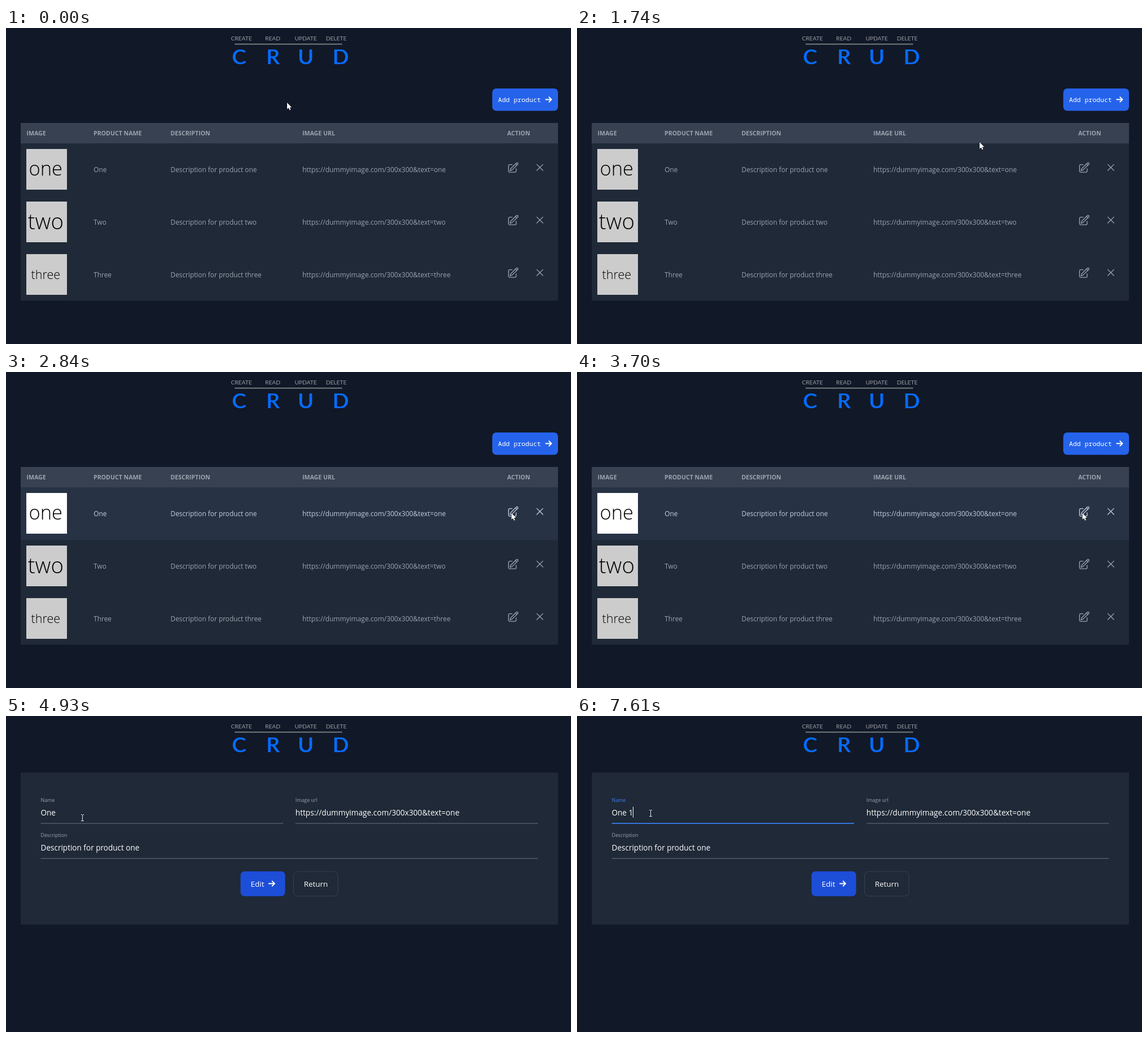
These frames come from a looping animation (1001 px wide and 559 px high, 8000 ms). An HTML page with a canvas:

```html
<!DOCTYPE html>
<html lang="en">
<head>
<meta charset="utf-8">
<title>CRUD</title>
<style>
html, body { margin: 0; width: 100%; height: 100%; overflow: hidden; background: #111827; }
canvas { display: block; }
</style>
</head>
<body>
<canvas id="stage" width="1001" height="559"></canvas>
<script>
const ctx = document.getElementById('stage').getContext('2d');
const LOOP = 8000, FORM_AT = 3790, FOCUS_AT = 5420, BLINK = 530;
const SANS = '"Open Sans", "Noto Sans", sans-serif';
const TITLE = 'Lato, sans-serif';
const MONO = '"Noto Sans Mono", monospace';
const GRAY = '#9ca3af', PANEL = '#1f2937', WHITE = '#ffffff';

const PENCIL = new Path2D('m16.862 4.487 1.687-1.688a1.875 1.875 0 1 1 2.652 2.652L10.582 16.07a4.5 4.5 0 0 1-1.897 1.13L6 18l.8-2.685a4.5 4.5 0 0 1 1.13-1.897l8.932-8.931Zm0 0L19.5 7.125M18 14v4.75A2.25 2.25 0 0 1 15.75 21H5.25A2.25 2.25 0 0 1 3 18.75V8.25A2.25 2.25 0 0 1 5.25 6H10');
const CROSS = new Path2D('M6 18 18 6M6 6l12 12');
const ARROW = new Path2D('M3 10h13M11 4.2l6 5.8-6 5.8');
const POINTER = new Path2D('M0 0V11.6L2.7 9.2 4.5 13.2 6.4 12.4 4.7 8.5H8.2Z');

// time, x, y
const POINTER_PATH = [[910, 498, 132], [1740, 713, 202], [2230, 859, 249], [2500, 887, 255], [2570, 887, 255], [2840, 895.5, 249.5]];
const BEAM_PATH = [[4050, 897, 250], [4860, 138, 181], [5150, 127.5, 175], [5640, 127.5, 175], [5750, 130.3, 171.5]];

const clamp = v => Math.max(0, Math.min(1, v));

function along(path, t) {
  const last = path.length - 1;
  if (t <= path[0][0]) return path[0].slice(1);
  if (t >= path[last][0]) return path[last].slice(1);
  const i = path.findIndex(k => k[0] > t) - 1;
  const a = path[i], b = path[i + 1];
  let u = (t - a[0]) / (b[0] - a[0]);
  if (i === 0) u = u * u * (1.6 - 0.6 * u) * 0.6 + u * 0.4;
  return [1, 2].map(n => a[n] + (b[n] - a[n]) * u);
}

function rect(x, y, w, h, fill) {
  ctx.fillStyle = fill;
  ctx.fillRect(x, y, w, h);
}

function rounded(x, y, w, h, fill, stroke) {
  ctx.beginPath();
  ctx.roundRect(x, y, w, h, 7);
  if (fill) { ctx.fillStyle = fill; ctx.fill(); }
  if (stroke) { ctx.strokeStyle = stroke; ctx.lineWidth = 1; ctx.stroke(); }
}

function text(s, x, y, size, fill, font = SANS, weight = 400, align = 'left') {
  ctx.font = `${weight} ${size}px ${font}`;
  ctx.textAlign = align;
  ctx.fillStyle = fill;
  ctx.fillText(s, x, y);
}

function icon(path, x, y, scale, color, width) {
  ctx.save();
  ctx.translate(x, y);
  ctx.scale(scale, scale);
  ctx.strokeStyle = color;
  ctx.lineWidth = width;
  ctx.lineCap = ctx.lineJoin = 'round';
  ctx.stroke(path);
  ctx.restore();
}

function heading() {
  const words = [['CREATE', 417, 413], ['READ', 472.5, 473], ['UPDATE', 531, 531], ['DELETE', 585, 593]];
  for (const [word, x, big] of words) {
    text(word, x, 22.3, 10.2, '#9a9da3', TITLE, 400, 'center');
    // doubled to thicken the upright strokes only
    for (const dx of [-0.6, 0.6]) text(word[0], big + dx, 64.2, 37.2, '#066bff', TITLE, 400, 'center');
  }
  rect(405, 27.7, 190.5, 1.7, '#85888e');
}

function row(name, y, size, base, hover) {
  const color = hover ? '#c3ccdb' : GRAY;
  const low = name.toLowerCase();
  rect(26, y, 952, 93, hover ? '#273345' : PANEL);
  rect(36, y + 10, 72, 72, hover ? WHITE : '#cccccc');
  text(low, 70.3, y + base, size, '#000000', SANS, 300, 'center');
  text(name, 155.3, y + 51, 11.85, color);
  text('Description for product ' + low, 291.5, y + 51, 11.85, color);
  text('https://dummyimage.com/300x300&text=' + low, 525, y + 51, 11.95, color);
  icon(PENCIL, 887.7, y + 32.3, 0.893, color, 1.5);
  icon(CROSS, 935.1, y + 32, 0.893, color, 1.5);
}

function list(t) {
  const [x, y] = along(POINTER_PATH, t);
  rounded(861.5, 107, 116.5, 39.5, '#2563eb');
  text('Add product', 871.8, 130.6, 11.5, WHITE, MONO, 500);
  icon(ARROW, 954, 119.2, 0.73, WHITE, 2.5);

  rect(26, 168, 952, 36, '#374151');
  const heads = [['IMAGE', 36.5], ['PRODUCT NAME', 155], ['DESCRIPTION', 291.5], ['IMAGE URL', 525], ['ACTION', 888]];
  for (const [s, hx] of heads) text(s, hx, 190, 10.6, GRAY, SANS, 700);

  row('Three', 390, 21.6, 54.3, false);
  row('Two', 297, 38.5, 59, false);
  row('One', 204, 34.5, 56.5, y > 204);
  rect(26, 482.5, 952, 1, '#111827');

  ctx.save();
  ctx.translate(x, y);
  ctx.lineJoin = 'round';
  ctx.lineWidth = 1;
  ctx.strokeStyle = '#000000';
  ctx.stroke(POINTER);
  ctx.fillStyle = WHITE;
  ctx.fill(POINTER);
  ctx.restore();
}

function field(label, value, x, y, w, size, blue = 0) {
  const mix = [[156, 59], [163, 130], [175, 246]].map(([a, b]) => Math.round(a + (b - a) * blue));
  text(label, x, y, 8.8, `rgb(${mix})`);
  text(value, x, y + 24, size, WHITE);
  rect(x, y + 36.9, w, 1.7, blue ? '#3b82f6' : '#4b5563');
}

function beam(x, y) {
  const cx = Math.round(x), cy = Math.round(y);
  rect(cx, cy - 5, 1, 11, '#e5e7eb');
  for (const dy of [-6, 5]) {
    rect(cx - 2, cy + dy, 2, 1, '#e5e7eb');
    rect(cx + 1, cy + dy, 2, 1, '#e5e7eb');
  }
}

function form(t) {
  const focus = t >= FOCUS_AT;
  const name = 'One' + (t >= 6880 ? ' ' : '') + (t >= 7610 ? '1' : '');
  rect(26, 100, 952, 269, PANEL);
  field('Name', name, 61.5, 152.2, 429.5, 13.55, focus ? clamp((t - FOCUS_AT + 60) / 330) : 0);
  field('Image url', 'https://dummyimage.com/300x300&text=one', 512.8, 152.2, 429.5, 13.65);
  field('Description', 'Description for product one', 61.5, 214.3, 880.8, 13.55);

  if (focus && Math.floor((t - FOCUS_AT) / BLINK) % 2 === 0) {
    ctx.font = `400 13.55px ${SANS}`;
    rect(Math.round(61.5 + ctx.measureText(name).width - 0.5), 160.5, 1, 19, WHITE);
  }

  rounded(415.5, 274.7, 79, 44, '#1d4ed8');
  text('Edit', 433.5, 302, 13.5, WHITE);
  icon(ARROW, 463.5, 289.2, 0.73, WHITE, 2.5);
  rounded(509.5, 275.2, 78.5, 43.3, null, '#374151');
  text('Return', 527.8, 302, 13.35, WHITE);
  beam(...along(BEAM_PATH, t));
}

function draw(t) {
  rect(0, 0, 1001, 559, '#111827');
  heading();
  if (t < FORM_AT) list(t); else form(t);
}

const start = performance.now();
function tick() {
  draw((performance.now() - start) % LOOP);
  requestAnimationFrame(tick);
}
tick();
</script>
</body>
</html>
```
